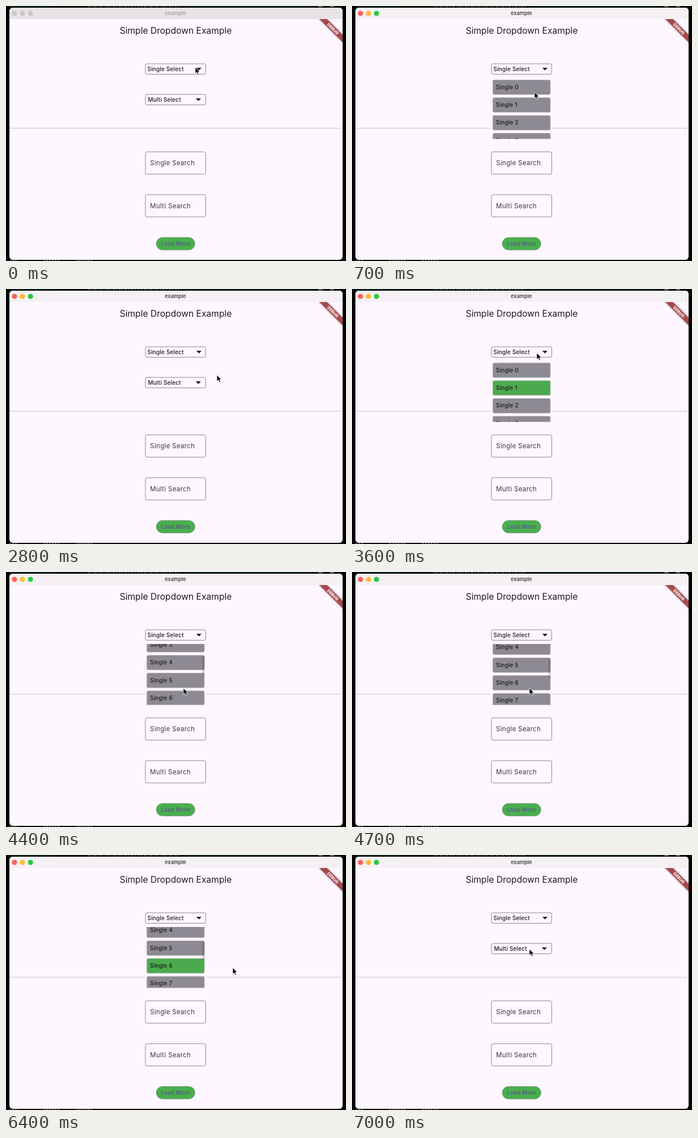
These frames come from a looping animation (600 by 450 pixels, 7.1 s). An HTML page:

```html
<!DOCTYPE html>
<html lang="en">
<head>
<meta charset="utf-8">
<title>Dropdown example</title>
<style>
  html, body { margin: 0; width: 100%; height: 100%; overflow: hidden; background: #000; }
  svg { display: block; width: 600px; height: 450px; }
  text { font-family: Inter, Roboto, sans-serif; fill: #1d1b20; }
  .label { font-size: 10px; font-weight: 450; letter-spacing: .17px; }
  .field { font-size: 11.3px; letter-spacing: .42px; fill: #38343b; }
  .box { fill: #fef7ff; stroke: #8a858d; stroke-width: 1; }
</style>
</head>
<body>
<svg viewBox="0 0 600 450">
  <defs>
    <clipPath id="window"><rect x="6" y="3" width="588" height="445" rx="6"/></clipPath>
    <clipPath id="viewport"><rect x="246" y="127" width="107" height="107.5"/></clipPath>
    <filter id="blur" x="-20%" y="-100%" width="140%" height="300%"><feGaussianBlur stdDeviation="1.6"/></filter>
  </defs>
  <rect width="600" height="450"/>
  <g fill="none" stroke-width="1.5">
    <path d="M6 1H84M314 1H540" stroke="#0d2b2c"/>
    <path d="M144 1H306" stroke="#4c6264" stroke-dasharray="4 2 2 3"/>
    <path d="M551 1h8M572 1h7" stroke="#858b8b"/>
    <path d="M6 449.3h14M66 449.3h30M124 449.3h28" stroke="#626262" stroke-dasharray="3 2"/>
  </g>

  <g clip-path="url(#window)">
    <rect x="6" y="3" width="588" height="445" fill="#fef7ff"/>
    <rect id="bar" x="6" y="3" width="588" height="20"/>
    <g id="lights"></g>
    <text id="caption" x="299" y="16.2" text-anchor="middle" font-size="9.2" font-weight="600">example</text>
    <text x="299.5" y="48.6" text-anchor="middle" font-size="15.6">Simple Dropdown Example</text>
    <path d="M6 215.6H592" stroke="#d3ccd4" stroke-width="1.4"/>

    <g transform="translate(577 40.3) rotate(45)">
      <rect x="-40" y="-4.8" width="80" height="9.6" opacity=".5" filter="url(#blur)"/>
      <rect x="-40" y="-4.5" width="80" height="9" fill="#a8484b"/>
      <text y="2.6" text-anchor="middle" font-size="7.2" font-weight="800" style="fill:#fff">DEBUG</text>
    </g>
    <rect x="540" y="3" width="54" height="20" id="barCover"/>

    <rect class="box" x="246" y="102" width="106.5" height="18.4" rx="2.5"/>
    <text class="label" x="249.5" y="114.7">Single Select</text>
    <path d="M336 109h9l-4.5 4.7z" fill="#1d1b20"/>
    <rect class="box" x="246" y="156" width="106.5" height="18.4" rx="2.5"/>
    <text class="label" x="250.5" y="168.7">Multi Select</text>
    <path d="M335 163h9l-4.5 4.7z" fill="#1d1b20"/>

    <rect class="box" x="246" y="257.4" width="106.5" height="39.4" rx="3"/>
    <text class="field" x="254.3" y="281.3">Single Search</text>
    <rect class="box" x="246" y="333" width="106.5" height="39.2" rx="3"/>
    <text class="field" x="254.3" y="356.8">Multi Search</text>
    <rect x="265.2" y="408.4" width="68.2" height="22.2" rx="11.1" fill="#49af4e" stroke="#7b8c79" stroke-width=".8"/>
    <text x="299.2" y="423" text-anchor="middle" font-size="9.7" font-weight="500" letter-spacing=".22" style="fill:#5f4c9c">Load More</text>

    <g id="list">
      <rect x="245.5" y="122" width="107.5" height="114" fill="#fef7ff"/>
      <g clip-path="url(#viewport)">
        <g id="items"></g>
        <rect id="thumb" x="346.5" width="4.5" height="34" rx="2"/>
      </g>
    </g>
  </g>
  <path id="cursor" d="M0 0V11.2L2.6 8.8 4.4 13 6.4 12.1 4.6 8.1H8.2Z" fill="#000" stroke="#fff" stroke-width=".8"/>
</svg>
<script>
const LOOP = 7100, STEP = 100;
const $ = id => document.getElementById(id);

function add(parent, tag, attrs, text = '') {
  const node = document.createElementNS('http://www.w3.org/2000/svg', tag);
  for (const key in attrs) node.setAttribute(key, attrs[key]);
  node.textContent = text;
  return parent.appendChild(node);
}

// Each row: time, then values.
const pointer = [
  [0, 334, 108], [400, 334, 108], [700, 322, 152], [1100, 312, 172], [1500, 312, 172],
  [2000, 402, 177], [2500, 402, 177], [3200, 326, 113], [3600, 326, 113],
  [4200, 313, 205], [4900, 313, 205], [5200, 312, 195], [5800, 312, 195],
  [6300, 400, 199], [6600, 400, 199], [7000, 313, 166]
];
const scroll = [[0, 0], [3900, 0], [4600, 136]];
const thumbAlpha = [
  [0, 0], [1700, 0], [1900, .16], [2300, .16], [2500, 0], [3900, 0], [4000, .16],
  [5000, .16], [5300, 0], [5900, 0], [6100, .16]
];

function sample(track, t) {
  const next = track.findIndex(row => row[0] > t);
  if (next < 0) return track[track.length - 1].slice(1);
  const a = track[next - 1], b = track[next];
  const p = (t - a[0]) / (b[0] - a[0]), eased = p * p * (3 - 2 * p);
  return a.slice(1).map((v, i) => v + (b[i + 1] - v) * eased);
}

const lights = ['#fe5f57', '#febc2e', '#29c740'].map((color, i) => ({
  color, node: add($('lights'), 'circle', { cx: 15 + 14.1 * i, cy: 13, r: 4.6 })
}));
const rows = Array.from({ length: 15 }, (_, i) => {
  const y = 130.4 + 31.4 * i;
  const box = add($('items'), 'rect', {
    x: 248.5, y, width: 101.5, height: 25.8, rx: 2.5, stroke: '#aaa5ad', 'stroke-width': .5
  });
  add($('items'), 'text', { class: 'label', x: 254, y: y + 16.2 }, 'Single ' + i);
  return box;
});

function render(t) {
  const active = t >= 200;
  const open = (t >= 400 && t < 2600) || (t >= 3300 && t < 6700);
  const selected = t < 1400 ? -1 : t < 5500 ? 1 : 6;
  const [x, y] = sample(pointer, t), [offset] = sample(scroll, t);

  for (const id of ['bar', 'barCover']) $(id).setAttribute('fill', active ? '#f4f0f3' : '#e7e3e6');
  $('caption').style.fill = active ? '#464348' : '#a6a2a6';
  for (const { node, color } of lights) node.setAttribute('fill', active ? color : '#cbc7ca');

  $('list').style.display = open ? '' : 'none';
  $('items').setAttribute('transform', `translate(0 ${-offset})`);
  rows.forEach((row, i) => row.setAttribute('fill', i === selected ? '#4caa4e' : '#8e8a93'));
  $('thumb').setAttribute('y', 127 + offset * .19);
  $('thumb').setAttribute('opacity', sample(thumbAlpha, t)[0]);
  $('cursor').setAttribute('transform', `translate(${x} ${y})`);
}

const start = performance.now();
function tick() {
  const t = (performance.now() - start) % LOOP;
  render(Math.floor(t / STEP) * STEP);
  requestAnimationFrame(tick);
}
tick();
</script>
</body>
</html>
```
